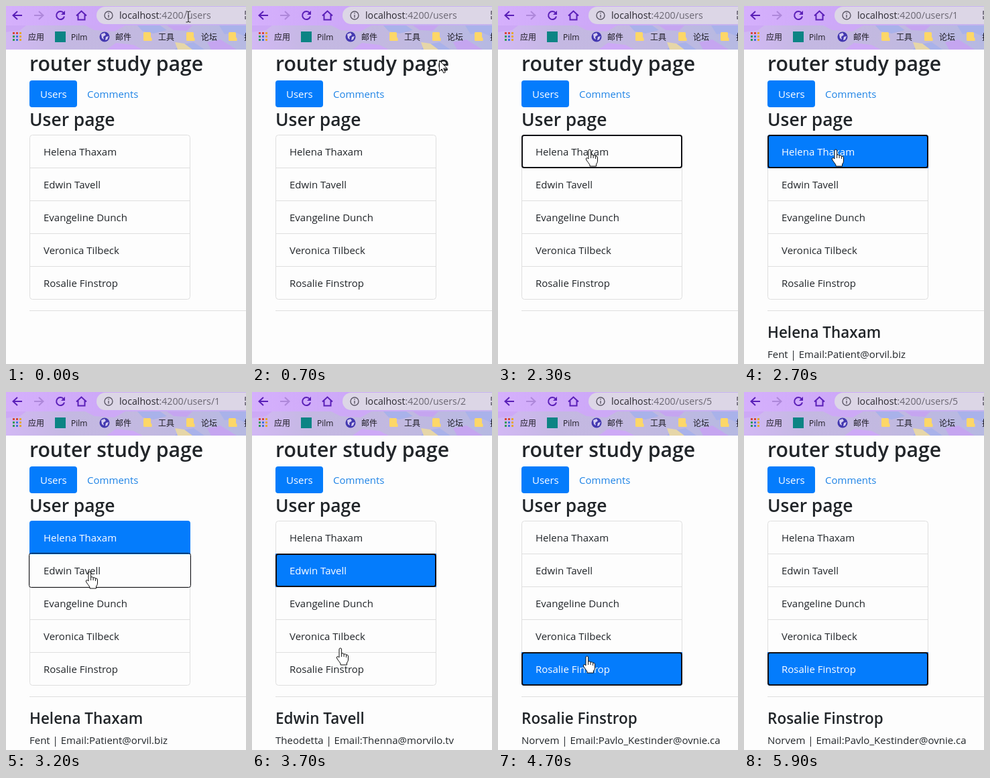
An HTML page for the animation above (6000 ms loop, 358 by 534 pixels).

```html
<!DOCTYPE html>
<html lang="en">
<head>
<meta charset="utf-8">
<title>router study page</title>
<style>
  html, body { margin: 0; width: 100%; height: 100%; overflow: hidden; background: #fdfdfd; }
  svg { display: block; width: 358px; height: 534px; }
  text { font-family: "Open Sans", "Noto Sans", sans-serif; font-size: 15px; fill: #212529; }
  .head { font-weight: 600; }
  .url { font-size: 14.2px; fill: #6a6672; }
  .mark { font-family: "Noto Sans CJK SC", "Noto Sans CJK", sans-serif; font-size: 12px; fill: #1c1a22; }
  .mark.latin { font-family: "Open Sans", sans-serif; }
  .icon { fill: none; stroke: #5a1fb8; stroke-width: 2; }
  .line { fill: none; stroke: #dfdfdf; }
  .ink { stroke: #111; stroke-linejoin: round; fill: #fff; }
</style>
</head>
<body>
<svg viewBox="0 0 358 534">
  <defs>
    <linearGradient id="sky">
      <stop offset="0" stop-color="#d5b0fc"/>
      <stop offset=".4" stop-color="#cda8f8"/>
      <stop offset="1" stop-color="#c5b4ee"/>
    </linearGradient>
    <linearGradient id="bar">
      <stop offset="0" stop-color="#d2b8f4"/>
      <stop offset=".25" stop-color="#c4b8e2"/>
      <stop offset=".6" stop-color="#c2b9e0"/>
      <stop offset="1" stop-color="#b6b9e2"/>
    </linearGradient>
    <clipPath id="barClip"><rect width="358" height="65"/></clipPath>
    <clipPath id="listClip"><rect x="35" y="192" width="240" height="246" rx="4"/></clipPath>
    <path id="folder" d="M0 1.500q0-1.500 1.500-1.500h8q1.500 0 1.500 1.500v6l1.500 1.500v4h-11q-1.500 0-1.500-1.500z" fill="#fdd768"/>
  </defs>

  <rect width="358" height="534" fill="#fdfdfd"/>

  <g clip-path="url(#barClip)">
    <rect width="358" height="30" fill="url(#sky)"/>
    <rect y="29" width="358" height="36" fill="url(#bar)"/>
    <path d="M0 29h30l-9 7-21 3zM118 29h60l-16 9-30-2zM150 65l14-10 26 3 14 7z" fill="#cda9f6"/>
    <path d="M196 29h34l10 7-20 5-16-3zM258 58l22-4 16 11h-44zM318 29h40v17l-14-6-18 2z" fill="#a9b2ea"/>
    <path d="M240 29h38l-8 8-20-1zM300 54l20-4 24 15h-38z" fill="#c5a5f0"/>
    <path d="M252 54l14 2 12 9h-22z" fill="#e6d6a8"/>

    <rect x="135" y="1" width="250" height="26" rx="13" fill="#dcd6e6"/>
    <g class="icon">
      <path d="M24 14H11M17 8l-6.500 6 6.500 6"/>
      <path d="M42 14h13M49 8l6.500 6-6.500 6" stroke="#ae88da"/>
      <path d="M86 10.500A6 6 0 1 0 87 15.500"/>
      <path d="M88 7v6h-6z" fill="#5a1fb8" stroke="none"/>
      <path d="M105 14.500l7.500-7 7.500 7M107.500 13v7.500h10V13"/>
    </g>
    <g fill="none" stroke="#5c5866" stroke-width="1.400">
      <circle cx="153" cy="14" r="6"/>
      <path d="M153 13v4.500M153 10v1.600M361 8h-4v5M357 15v4h4"/>
    </g>
    <text class="url" x="169" y="19"><tspan fill="#2c2a32">localhost</tspan><tspan id="path"></tspan></text>

    <g id="apps"></g>
    <rect x="73" y="38" width="16" height="16" fill="#0c8484"/>
    <circle cx="147" cy="46" r="7.500" fill="#4338b0"/>
    <path d="M142 42l5-2 2 3-4 3 1 4-3-2zM149 46l4-1-2 5-3 1z" fill="#d4cbf0"/>
    <use href="#folder" x="205" y="39"/>
    <use href="#folder" x="269" y="39"/>
    <use href="#folder" x="332" y="39"/>
    <text class="mark" x="33" y="51">应用</text>
    <text class="mark latin" x="97" y="51">Pilm</text>
    <text class="mark" x="163" y="51">邮件</text>
    <text class="mark" x="227" y="51">工具</text>
    <text class="mark" x="291" y="51">论坛</text>
    <text class="mark" x="355" y="51">技</text>
  </g>

  <text class="head" x="35" y="97" style="font-size:30.2px">router study page</text>
  <rect x="35" y="111" width="71" height="40" rx="4" fill="#047cfc"/>
  <text x="51" y="137" style="fill:#fff">Users</text>
  <text x="121" y="137" style="fill:#1f84e6">Comments</text>
  <text class="head" x="35" y="179" style="font-size:26.4px">User page</text>

  <rect class="line" x="35.500" y="192.500" width="239" height="245" rx="4"/>
  <path class="line" d="M35 241.500h240M35 290.500h240M35 339.500h240M35 388.500h240M35 454.500h323"/>
  <g clip-path="url(#listClip)">
    <rect id="active" x="35" width="240" height="50" fill="#047cfc"/>
  </g>
  <rect id="ring" rx="3" fill="none" stroke="#101014"/>
  <g id="rows"></g>

  <text id="name" class="head" x="35" y="495" style="font-size:22.5px"></text>
  <text id="info" x="35" y="525"></text>

  <g id="beam" fill="none" stroke="#222">
    <path d="M-3.500-8h2.500l1 1 1-1h2.500M0-7V7M-3.500 8h2.500l1-1 1 1h2.500"/>
  </g>
  <path id="arrow" class="ink" d="M.5.5v16l3.700-3.500 2.700 6 2.500-1.100-2.700-5.900h5.200z"/>
  <g id="hand">
    <path class="ink" d="M-2 13V2q0-2 1.800-2t1.800 2v6q3-1 3.500 1 3-.8 3.500 1 2.900-.5 2.900 2v5q0 3-2 5v3H0v-2q-2-3-5-7-1.500-2.500 0-3.300 1.500-.6 3 1.300z"/>
    <path d="M1.600 8v5M5.100 9v4M8.600 10v4" stroke="#111" fill="none"/>
  </g>
</svg>
<script>
const LOOP = 6000, STEP = 100, ROW = 49, TOP = 192;
const $ = id => document.getElementById(id);

const users = [
  ["Helena Thaxam", "Fent", "Patient@orvil.biz"],
  ["Edwin Tavell", "Theodetta", "Thenna@morvilo.tv"],
  ["Evangeline Dunch"],
  ["Veronica Tilbeck"],
  ["Rosalie Finstrop", "Norvem", "Pavlo_Kestinder@ovnie.ca"]
];

// [time, x, y] of the pointer tip
const track = [
  [0, 272, 16], [400, 272, 16], [1100, 290, 182], [1600, 290, 182],
  [2100, 137, 214], [2700, 137, 214], [3100, 125, 268], [3300, 125, 268],
  [3700, 132, 382], [4000, 133, 394], [5000, 133, 394]
];
const HIDE = 5000;

// [time, focused row, opened row]
const states = [
  [0, -1, -1], [2200, 0, -1], [2400, 0, 0], [3200, 1, 0],
  [3300, 1, 1], [4200, 4, 1], [4300, 4, 4]
];

const SVG = "http://www.w3.org/2000/svg";
function set(el, attrs) {
  for (const key in attrs) el.setAttribute(key, attrs[key]);
  return el;
}
function add(parent, tag, attrs, text = "") {
  const el = set(document.createElementNS(SVG, tag), attrs);
  el.textContent = text;
  parent.append(el);
  return el;
}

const rows = users.map(([name], i) =>
  add($("rows"), "text", { x: 56, y: TOP + 31 + i * ROW }, name));

const dots = ["#d9473b", "#d9473b", "#e5a72c", "#2f9a55", "#3f74d8", "#e5a72c", "#2f9a55", "#3f74d8", "#e5a72c"];
dots.forEach((fill, i) =>
  add($("apps"), "rect", { x: 10 + i % 3 * 5, y: 39 + Math.floor(i / 3) * 5, width: 3, height: 3, fill }));

function show(el, on) {
  el.style.display = on ? "" : "none";
}

function tipAt(t) {
  const i = Math.max(1, track.findIndex(p => p[0] >= t));
  const [t0, x0, y0] = track[i - 1], [t1, x1, y1] = track[i];
  const k = (t - t0) / (t1 - t0), e = k * k * (3 - 2 * k);
  return [x0 + (x1 - x0) * e, y0 + (y1 - y0) * e];
}

function drawPointer(t) {
  let kind = "";
  if (t < HIDE) {
    const [x, y] = tipAt(t);
    const overList = x > 35 && x < 275 && y > TOP && y < TOP + 5 * ROW;
    kind = y < 28 ? "beam" : overList ? "hand" : "arrow";
    set($(kind), { transform: `translate(${Math.round(x)} ${Math.round(y)})` });
  }
  for (const id of ["beam", "arrow", "hand"]) show($(id), id === kind);
}

// The ring is thin and one pixel wider in the step of the press.
function drawRing(row, pressed) {
  const inset = pressed ? -0.5 : 1;
  set($("ring"), {
    x: 35 + inset, y: TOP + row * ROW + inset,
    width: 240 - 2 * inset, height: 50 - 2 * inset,
    "stroke-width": pressed ? 1 : 2
  });
  show($("ring"), row >= 0);
}

function drawPage(t) {
  const [since, focus, open] = states.filter(s => s[0] <= t).pop();
  const user = users[open];
  show($("active"), user);
  set($("active"), { y: TOP + open * ROW });
  drawRing(focus, focus !== open && t - since < STEP);
  rows.forEach((row, i) => row.style.fill = i === open ? "#fff" : "");
  $("path").textContent = ":4200/users" + (user ? "/" + (open + 1) : "");
  $("name").textContent = user ? user[0] : "";
  $("info").textContent = user ? `${user[1]} | Email:${user[2]}` : "";
}

const start = performance.now();
function tick() {
  const t = Math.floor((performance.now() - start) % LOOP / STEP) * STEP;
  drawPage(t);
  drawPointer(t);
  requestAnimationFrame(tick);
}
tick();
</script>
</body>
</html>
```
